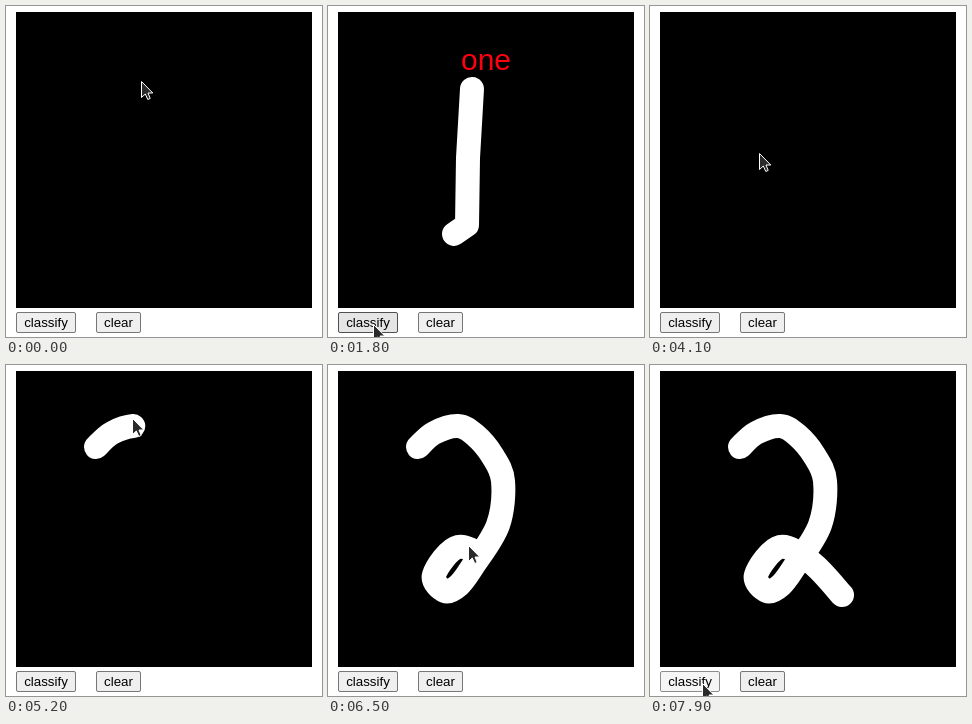
Write an HTML page that moves like this. It is 316 by 331 pixels and loops after 8 s.

```html
<!DOCTYPE html>
<html lang="en">
<head>
<meta charset="utf-8">
<title>Digit classifier</title>
<style>
  html, body { margin: 0; width: 100%; height: 100%; overflow: hidden; background: #fff; }
  body { position: relative; }
  svg, button { position: absolute; }
  svg { left: 0; top: 0; width: 316px; height: 331px; }
  text, button { font-family: "Liberation Sans", Arial, sans-serif; }
  text { font-size: 30px; fill: #ff0010; }
  .ink { fill: none; stroke: #fff; stroke-width: 24; stroke-linecap: round; stroke-linejoin: round; }
  button {
    top: 306px; height: 21px; box-sizing: border-box; padding: 0;
    border: 1px solid #767676; border-radius: 2px; background: #efefef;
    color: #000; font-size: 13.3333px; pointer-events: none;
  }
  #classify { left: 10px; width: 60px; }
  #clear { left: 90px; width: 45px; }
  button.hover { background: #e5e5e5; border-color: #4f4f4f; }
  button.active { background: #f5f5f5; border-color: #8d8d8d; }
</style>
</head>
<body>
<svg viewBox="0 0 316 331">
  <rect x="10" y="6" width="296" height="296"/>
  <path id="one" class="ink" d="M144 83L140 152L139 219L126 228"/>
  <path id="two" class="ink"/>
  <text id="label" x="133" y="64">one</text>
</svg>
<button id="classify" tabindex="-1">classify</button>
<button id="clear" tabindex="-1">clear</button>
<svg viewBox="0 0 316 331">
  <path id="cursor" d="M.5.5V16.5L4.3 13L6.8 18.5L9.2 17.4L7 12H11.8Z" fill="#2a2a2a" stroke="#fff"/>
</svg>
<script>
const LOOP = 8000, STEP = 100;
const $ = id => document.getElementById(id);
const [one, two, label, classify, clear, cursor] =
  ["one", "two", "label", "classify", "clear", "cursor"].map($);

// Smooth curve through the points (Catmull-Rom as cubic Béziers).
function spline(pts) {
  const at = i => pts[Math.max(0, Math.min(pts.length - 1, i))];
  const handle = (i, s) => at(i).map((v, n) => v + s * (at(i + 1)[n] - at(i - 1)[n]) / 6);
  return "M" + pts[0] + pts.slice(1).map((p, i) => `C${handle(i, 1)} ${handle(i + 1, -1)} ${p}`).join("");
}

two.setAttribute("d", spline([
  [90, 82], [106, 68], [130, 61], [147, 70], [164, 90], [175, 116], [170, 160], [145, 201],
  [131, 220], [117, 226], [106, 210], [130, 182], [162, 198], [192, 230]
]));

// Each act takes its progress and the pointer's last place, and gives the new place.
function hop(from, to, x, y, bend = 0, pow = 1) {
  const move = (p, [x0, y0]) => {
    const e = p ** pow, arc = (4 * e * (1 - e)) ** 2;
    return [x0 + (x - x0) * e + bend * arc, y0 + (y - y0) * e];
  };
  return { from, to, move };
}

// The pointer runs slightly ahead of the ink.
function draw(from, to, path, pow = 1) {
  const length = path.getTotalLength();
  const move = p => {
    const drawn = length * p ** pow;
    path.setAttribute("stroke-dasharray", Math.max(.01, drawn) + " 2000");
    const tip = path.getPointAtLength(drawn + Math.min(8, drawn));
    return [tip.x - 9, tip.y - 8.5];
  };
  return { from, to, move };
}

const acts = [
  draw(100, 600, one),
  hop(600, 900, 29, 302),
  hop(900, 1700, 45, 318),
  hop(2000, 2700, 120, 316),
  hop(3000, 3700, 109, 151, -33),
  hop(4000, 4500, 93, 58, 45, 2),
  hop(4600, 4900, 81, 73),
  draw(5100, 6900, two, .76),
  hop(7000, 7900, 52, 318, -14)
];

function pointer(t) {
  let place = [135, 75];
  for (const { from, to, move } of acts)
    if (t >= from) place = move(Math.min(1, (t - from) / (to - from)), place);
  return place;
}

const show = (el, on) => el.setAttribute("visibility", on ? "visible" : "hidden");

function setButton(el, [x, y], pressed) {
  const dx = x - el.offsetLeft, dy = y - el.offsetTop;
  const over = dx >= 0 && dx < el.offsetWidth && dy >= 0 && dy < el.offsetHeight;
  el.className = over ? (pressed ? "active" : "hover") : "";
}

function render(time) {
  const t = Math.floor(time % LOOP / STEP) * STEP;
  const tip = pointer(t);
  show(one, t >= 100 && t < 2900);
  show(label, t >= 1500 && t < 2900);
  show(two, t >= 5100);
  setButton(classify, tip, t === 1400 || t === 7900);
  setButton(clear, tip, t === 2800);
  cursor.setAttribute("transform", `translate(${tip.map(Math.round)})`);
}

const start = performance.now();
function frame() {
  render(performance.now() - start);
  requestAnimationFrame(frame);
}
frame();
</script>
</body>
</html>
```
